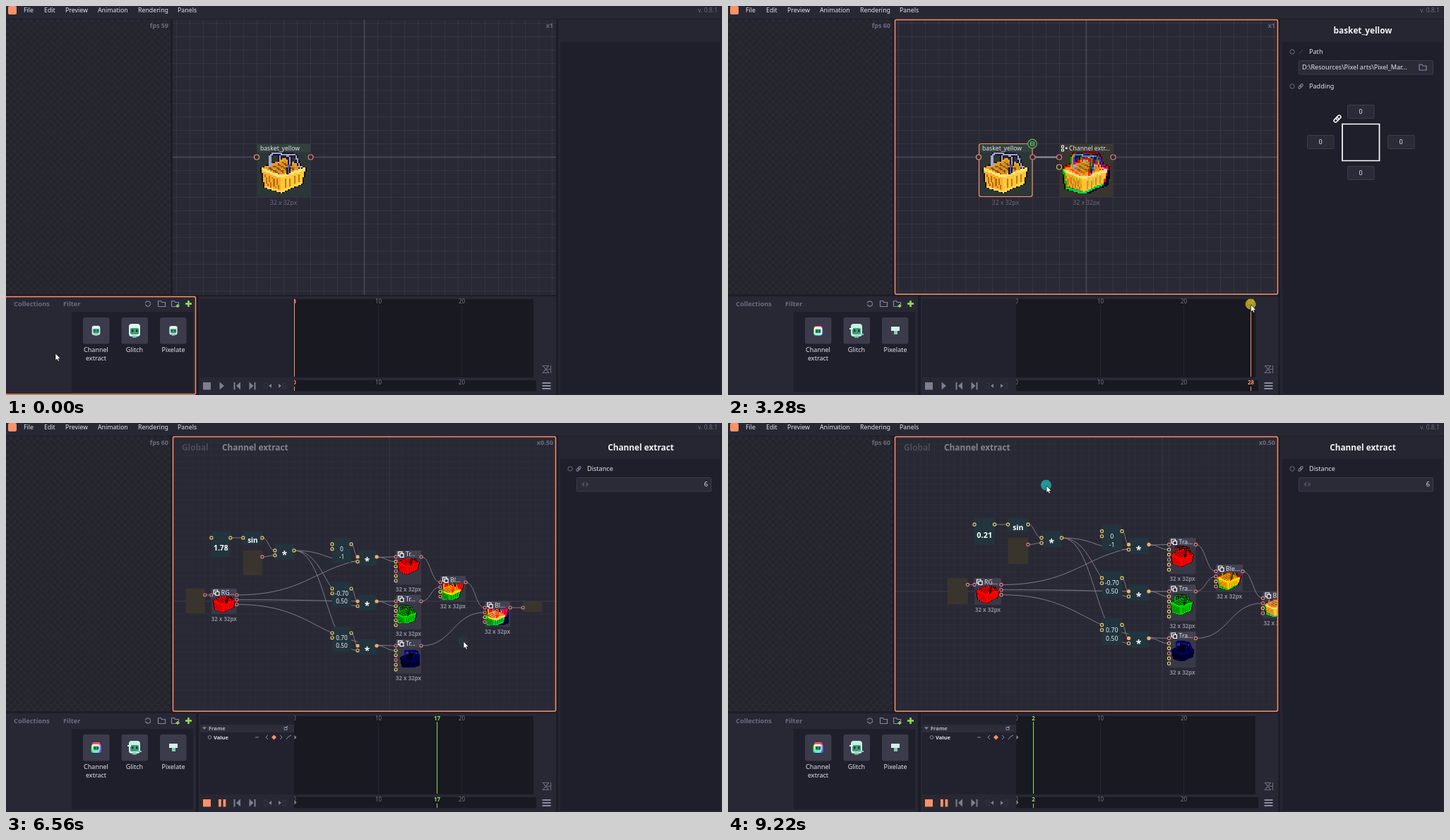
An HTML page with a canvas for the animation above (9290 ms loop, 1014 px wide and 552 px high).

```html
<!DOCTYPE html>
<html lang="en">
<head>
<meta charset="utf-8">
<title>Node editor</title>
<style>
html, body { margin: 0; width: 100%; height: 100%; overflow: hidden; background: #1e1e2a; }
canvas { display: block; }
</style>
</head>
<body>
<canvas id="stage" width="1014" height="552"></canvas>
<script>
const LOOP = 9290, UNIT = 19;
const c = document.getElementById('stage').getContext('2d');
const C = {
  panel: '#282834', dark: '#1f1f2b', deep: '#191921', edge: '#1d1d28', thumb: '#3b3b4c',
  grey: '#6d6b80', dim: '#4b4a5b', text: '#e4e4ec', accent: '#ff9166', lime: '#8fde5d',
  pink: '#e87f86', gold: '#f0cf70', math: '#22343e', image: '#383846', io: '#39352d'
};

// Moments of the session
const DROP = 900, FOCUS = 1040, PICK = 1230, LINK = 2170, ENTER = 4700, PLAY = 6155;

const pointer = [
  [0, 70, 493], [100, 70, 493], [420, 128, 460], [520, 128, 460], [880, 470, 196], [960, 470, 196],
  [1200, 395, 235], [1450, 395, 235], [1700, 431, 215], [1790, 431, 215], [2080, 469, 221],
  [2200, 469, 221], [2700, 411, 424], [2800, 411, 424], [3300, 742, 424], [3800, 480, 424],
  [3920, 480, 424], [4300, 520, 249], [4750, 520, 249], [5100, 516, 264], [5690, 516, 264],
  [5980, 306, 538], [6190, 306, 538], [6480, 648, 310], [8620, 648, 310], [8860, 374, 99],
  [8930, 374, 99], [9220, 451, 89], [LOOP, 451, 89]
];
// time, zoom, origin x, origin y
const camera = [
  [ENTER, 1, 507, 214.5], [5120, 1, 507, 214.5], [5320, .686, 510, 229], [5400, .65, 510.5, 231],
  [5450, .65, 510.5, 231], [5620, .4, 512, 245], [6380, .4, 512, 245], [6470, .4, 559.4, 262.7],
  [6500, .4, 559.4, 262.7], [6560, .474, 543, 253], [6680, .5, 537.3, 249.6], [8930, .5, 537.3, 249.6],
  [9220, .5, 615, 239], [LOOP, .5, 615, 239]
];
const presses = [
  [500, 900], [1220, 1290], [1740, 2170], [2770, 3850], [4560, 4610], [4670, 4720], [6110, 6180],
  [6380, 6470, 1], [8930, LOOP, 1]
];
const zoomLabels = [[5120, '1'], [5220, '0.80'], [5450, '0.65'], [5520, '0.50'], [6500, '0.40'], [LOOP, '0.50']];

function sample(keys, t) {
  let i = 0;
  while (i < keys.length - 2 && keys[i + 1][0] <= t) i++;
  const a = keys[i], b = keys[i + 1];
  let k = Math.min(1, Math.max(0, (t - a[0]) / (b[0] - a[0])));
  k = k * k * (3 - 2 * k);
  return a.slice(1).map((v, n) => v + (b[n + 1] - v) * k);
}

// Drawing helpers
function text(s, x, y, size = 9, color = C.text, align = 'left', weight = 500) {
  c.font = `${weight} ${size}px "Noto Sans", "Open Sans", sans-serif`;
  c.textAlign = align;
  c.fillStyle = color;
  c.fillText(s, x, y + size * .35);
}
function box(x, y, w, h, fill, stroke, r = 0, lw = 1) {
  c.beginPath();
  c.roundRect(x, y, w, h, r);
  if (fill) { c.fillStyle = fill; c.fill(); }
  if (stroke) { c.strokeStyle = stroke; c.lineWidth = lw; c.stroke(); }
}
function trace(pts) {
  c.beginPath();
  pts.forEach(p => c.lineTo(p[0], p[1]));
}
function line(pts, color, w = 1) {
  trace(pts);
  c.strokeStyle = color;
  c.lineWidth = w;
  c.stroke();
}
function poly(pts, fill) {
  trace(pts);
  c.fillStyle = fill;
  c.fill();
}
function ring(x, y, r, stroke, fill, w = 1.2) {
  c.beginPath();
  c.arc(x, y, r, 0, 7);
  if (fill) { c.fillStyle = fill; c.fill(); }
  c.strokeStyle = stroke;
  c.lineWidth = w;
  c.stroke();
}
function wire(x1, y1, x2, y2, color, w) {
  const m = (x1 + x2) / 2;
  c.beginPath();
  c.moveTo(x1, y1);
  c.bezierCurveTo(m, y1, m, y2, x2, y2);
  c.strokeStyle = color;
  c.lineWidth = w;
  c.stroke();
}
function clipTo(x, y, w, h, draw) {
  c.save();
  c.beginPath();
  c.rect(x, y, w, h);
  c.clip();
  draw();
  c.restore();
}

// Pixel sprites
function grid32() {
  const g = document.createElement('canvas').getContext('2d');
  g.canvas.width = g.canvas.height = 32;
  return g;
}
function makeBasket() {
  const g = grid32();
  const paint = (pts, color, width) => {
    const p = new Path2D();
    pts.forEach(q => p.lineTo(q[0], q[1]));
    if (!width) p.closePath();
    g.lineWidth = width || 1;
    g.fillStyle = color;
    for (let i = 0; i < 1024; i++) {
      const x = i % 32, y = i >> 5;
      if (width ? g.isPointInStroke(p, x + .5, y + .5) : g.isPointInPath(p, x + .5, y + .5)) g.fillRect(x, y, 1, 1);
    }
  };
  const L = [1, 15], F = [14, 20.5], R = [31, 15], B = [17, 8.5], FB = [14.5, 31], LB = [3, 27], RB = [28.5, 24.5];
  paint([L, B, R, RB, FB, LB, L, F], '#1a0c08', 2);
  paint([L, B, R, F], '#de9420');
  for (let i = 0; i < 4; i++) paint([[5 + i * 3.4, 13.5 - i], [13 + i * 3.4, 18.5 - i]], '#8d520c', 1);
  paint([L, F, FB, LB], '#f8b028');
  paint([F, R, RB, FB], '#ffc93a');
  for (let i = 1; i < 5; i++) {
    paint([[1 + i * 2.6, 18 + i], [3 + i * 2.4, 26 + i * .8]], '#b96c10', 1);
    paint([[14 + i * 3.2, 23.5 - i], [14.5 + i * 2.9, 29 - i * 1.2]], '#c27a10', 1);
  }
  paint([LB, FB, RB], '#ffd95c', 1.2);
  paint([L, B, R], '#e7a326', 1.2);
  paint([L, F, R], '#ffe173', 2);
  const arcs = [
    [[7, 14], [7, 6], [9, 4.5], [17, 4.5], [21, 8], [19, 19]],
    [[13, 9], [14, 6], [19, 5], [24, 6], [27.5, 15]]
  ];
  for (const a of arcs) {
    paint(a, '#15142a', 2.6);
    paint(a, '#a5a6c6', 1.1);
  }
  paint([[20, 12], [19.5, 19]], '#4a55a8', 1.3);
  return g.canvas;
}
function tint(src, color) {
  const g = grid32();
  g.drawImage(src, 0, 0);
  g.globalCompositeOperation = 'multiply';
  g.fillStyle = color;
  g.fillRect(0, 0, 32, 32);
  g.globalCompositeOperation = 'destination-in';
  g.drawImage(src, 0, 0);
  return g.canvas;
}
const basket = makeBasket();
const channels = ['#f00', '#0f0', '#00f'].map(k => tint(basket, k));
const shifts = [[0, -1], [-.7, .5], [.7, .5]];
const mixer = grid32();

function mix(ids, amount) {
  mixer.globalCompositeOperation = 'lighter';
  mixer.clearRect(0, 0, 32, 32);
  for (const i of ids) mixer.drawImage(channels[i], Math.round(shifts[i][0] * amount), Math.round(shifts[i][1] * amount));
  return mixer.canvas;
}

// Contents of the group: kind, title, x, y, w, h, inputs, outputs, extra
const nodes = [
  ['num', '', -28, -11, 3, 4, 1, 1],
  ['sin', '', -23, -11, 3, 2.1, 1, 1],
  ['io', '', -23, -8, 3, 3.9, 0, 1],
  ['mul', 'Math', -18, -9, 3, 2.4, 2, 1],
  ['io', '', -32, -2, 3, 3.9, 0, 1],
  ['img', 'RGB Extract', -28, -2, 4, 4, 1, 3, 'r'],
  ...[0, 1, 2].flatMap(i => [
    ['vec', 'Vector2', -9, -10 + 7 * i, 3, 3.9, 2, 1, i],
    ['mul', 'Math', -5, -8 + 7 * i, 3, 2.4, 2, 1, 'array'],
    ['img', 'Transform', 1, -8 + 7 * i, 4, 5.4, 6, 1, [i]]
  ]),
  ['img', 'Blend', 8, -4, 4, 4, 4, 1, [0, 1]],
  ['img', 'Blend', 15, 0, 4, 4, 4, 1, [0, 1, 2]],
  ['io', '', 21, 0, 3, 1.7, 1, 0]
];
// from node, output, to node, input
const links = [
  [0, 0, 1, 0], [1, 0, 3, 0], [2, 0, 3, 1], [4, 0, 5, 0],
  ...[0, 1, 2].flatMap(i => [[3, 0, 7 + 3 * i, 1], [6 + 3 * i, 0, 7 + 3 * i, 0], [7 + 3 * i, 0, 8 + 3 * i, 1], [5, i, 8 + 3 * i, 0]]),
  [8, 0, 15, 0], [11, 0, 15, 1], [15, 0, 16, 0], [14, 0, 16, 1], [16, 0, 17, 0]
];
const vectors = [['0', '-1'], ['-0.70', '0.50'], ['0.70', '0.50']];

function fit(s, w, size) {
  c.font = `500 ${size}px "Noto Sans", "Open Sans", sans-serif`;
  if (c.measureText(s).width <= w) return s;
  while (s.length > 1 && c.measureText(s + '...').width > w) s = s.slice(0, -1);
  return s + '...';
}
function preview(img, x, y, w, h) {
  const k = w * .875;
  c.imageSmoothingEnabled = false;
  c.drawImage(img, x + (w - k) / 2, y + (h - k) / 2, k, k);
}
function backdrop(s, ox, oy) {
  box(236, 19, 543, 391, '#292935');
  const u = UNIT * s;
  const shade = `rgba(150,150,180,${.02 + .08 * s * s})`;
  for (let x = ox - Math.ceil((ox - 236) / u) * u; x < 779; x += u) line([[x, 19], [x, 410]], shade);
  for (let y = oy - Math.ceil((oy - 19) / u) * u; y < 410; y += u) line([[236, y], [779, y]], shade);
  const axis = `rgba(140,140,165,${.03 + .2 * s * s})`;
  line([[ox, 19], [ox, 410]], axis, 1.8);
  line([[236, oy], [779, oy]], axis, 1.8);
}
function drawGroup(t, frame) {
  const [s, ox, oy] = sample(camera, t), u = UNIT * s, r = .9 + 2.4 * s;
  const angle = frame * Math.PI / 30, amount = Math.sin(angle) * 6;
  backdrop(s, ox, oy);
  const port = (n, i, out) => [ox + (n[2] + (out ? n[4] : 0)) * u, oy + (n[3] + 1 + .75 * i) * u];
  for (const [a, o, b, i] of links) wire(...port(nodes[a], o, 1), ...port(nodes[b], i), '#85838f', .9);
  for (const n of nodes) {
    const [kind, title, nx, ny, nw, nh, ins, outs, extra] = n;
    const x = ox + nx * u, y = oy + ny * u, w = nw * u, h = nh * u, m = x + w / 2;
    const img = kind === 'img';
    box(x, y, w, h, img ? C.image : kind === 'io' ? C.io : C.math, null, 2);
    if (img) {
      preview(extra === 'r' ? channels[0] : mix(extra, amount), x, y, w, h);
      box(x, y, w, 11, '#414152', null, 2);
      text('32 x 32px', m, y + h + 7, 7.9, '#8b8998', 'center', 600);
      box(x + 3.5, y + 2, 5.5, 5.5, null, '#fff', 0, 1.2);
      box(x + 6, y + 4.5, 5, 5, C.image, '#fff', 0, 1.2);
    }
    if (title && w > 33) text(fit(title, w - (img ? 16.7 : 9), 8.7), x + (img ? 14 : 5), y + 5.5, 8.7);
    if (kind === 'num') text(angle.toFixed(2), m, y + 2.6 * u, 1.15 * u, '#fff', 'center', 700);
    if (kind === 'sin') text('sin', m, y + 1.45 * u, 1.1 * u, '#fff', 'center', 700);
    if (kind === 'mul') text('*', m, y + 1.75 * u, 1.5 * u, '#fff', 'center', 700);
    if (kind === 'vec') vectors[extra].forEach((v, i) => text(v, m, y + (1.75 + 1.28 * i) * u, .92 * u, '#f0f0f4', 'center'));
    const warm = img || kind === 'io';
    for (let i = 0; i < ins; i++) {
      const full = extra === 'array' && !i;
      ring(...port(n, i), r, full ? '#f5ad68' : warm && (i === 0 || i === 3 || nh === 4 && i < 2) ? C.pink : C.gold, full ? '#f5ad68' : '#2b2b33', 1.1);
    }
    for (let i = 0; i < outs; i++) {
      const full = extra === 'array';
      ring(...port(n, i, 1), r, full ? '#f5ad68' : warm ? C.pink : C.gold, full ? '#f5ad68' : '#2b2b33', 1.1);
    }
  }
  text('Global', 249, 35, 11.8, '#4c4b59', 'left', 600);
  text('Channel extract', 306, 35, 11.8, '#86858f', 'left', 600);
  text('x' + zoomLabels.find(z => t < z[0])[1], 775, 28, 9, C.grey, 'right', 600);
}
function drawRoot(t, frame, mx, my) {
  backdrop(1, 507.5, 214.5);
  const linked = t >= LINK, made = t >= DROP, picked = t >= PICK, linking = t > 1740 && !linked;
  if (linked) wire(431, 214.5, 469, 214.5, '#94929d', 1.8);
  box(355, 195.5, 76.5, 75.5, '#2d3636', null, 3);
  preview(basket, 355, 195, 76, 76);
  box(355, 195.5, 76.5, 12, '#33413e', null, 3);
  if (picked) box(355.5, 195.5, 75.5, 75, null, C.accent, 3, 1.2);
  text('basket_yellow', 360, 201.5, 8.6);
  text('32 x 32px', 393, 279.5, 8.5, C.grey, 'center');
  ring(355, 214.5, 3.5, '#f59b6f', '#2b2b33');
  ring(431.5, 214.5, 3.5, C.pink, '#2b2b33');
  if (picked) {
    ring(431, 195.5, 6.3, '#62b35a', '#294034');
    box(428.5, 193, 5, 5, null, '#76c46a');
    line([[428.5, 195.5], [433.5, 195.5]], '#76c46a', .8);
  }
  if (made) {
    box(469.5, 195.5, 76.5, 75.5, '#38352f', null, 3);
    if (linked) preview(mix([0, 1, 2], Math.sin(frame * Math.PI / 30) * 6), 469.5, 195, 76, 76);
    box(469.5, 195.5, 76.5, 12, '#3b3831', null, 3);
    if (!picked) box(469.5, 195.5, 76, 75, null, C.accent, 3, 1.2);
    box(472.5, 198, 3, 3, null, '#fff');
    box(472.5, 203, 3, 3, null, '#fff');
    box(478, 200.5, 2.5, 2.5, '#fff');
    text('Channel extr...', 483, 201.5, 8.7);
    text(linked ? '32 x 32px' : '1 x 1px', 507.5, 279.5, 8.5, C.grey, 'center');
    ring(469, 214.5, 3.5, linked ? C.pink : '#f5a06a', '#2b2b33');
    ring(469, 228.5, 3.5, '#e9b06a', '#2b2b33');
    ring(545.5, 214.5, 3.5, C.pink, '#2b2b33');
  }
  if (linking) {
    wire(431.5, 214.5, mx, my, '#d8d2b0', 1.4);
    if (mx > 450) {
      text('Input', 463, 214.5, 8.7, '#fff', 'right', 700);
      text('Distance', 463, 228.5, 8.9, C.grey, 'right');
    }
  }
  text('x1', 775, 28, 9, C.grey, 'right', 600);
}

function folder(x, y) {
  line([[x - 5, y + 4], [x - 5, y - 4], [x - 1, y - 4], [x, y - 2], [x + 5, y - 2], [x + 5, y + 4], [x - 5, y + 4]], '#8886a0', 1.2);
}
function chain(x, y, k, color) {
  c.save();
  c.translate(x, y);
  c.rotate(-.8);
  box(-4 * k, -1.5 * k, 5 * k, 3 * k, null, color, 1.5 * k, k);
  box(-k, -1.5 * k, 5 * k, 3 * k, null, color, 1.5 * k, k);
  c.restore();
}
function drawInspector(t) {
  box(782, 19, 232, 533, '#262632');
  box(785, 51, 227, 499, C.dark);
  if (t < DROP) return;
  const image = t >= PICK && t < ENTER;
  text(image ? 'basket_yellow' : 'Channel extract', 899, 35, 11.8, '#f2f2f6', 'center', 600);
  ring(799, 65, 3.2, C.grey, null, 1);
  box(808.5, 77.5, 190, 19.5, '#2b2b38', '#3b3b4c', 1);
  if (!image) {
    chain(811, 65, 1, '#8886a0');
    text('Distance', 823, 65, 9.1);
    poly([[819, 83], [819, 91], [815, 87]], C.dim);
    poly([[821.5, 83], [821.5, 91], [825.5, 87]], C.dim);
    text('6', 994, 87, 9.1, C.text, 'right');
    return;
  }
  line([[808, 68], [814, 62]], C.dim);
  text('Path', 823, 65, 9.1);
  text('D:\\Resources\\Pixel arts\\Pixel_Mar...', 813, 87, 9.1);
  folder(984, 87);
  ring(799, 114, 3.2, C.grey, null, 1);
  chain(811, 114, 1, '#8886a0');
  text('Padding', 823, 114, 9.1);
  for (const [x, y] of [[877, 140], [820, 183], [934, 183], [877, 227]]) {
    box(x + .5, y + .5, 37.5, 19, '#2b2b38', '#3b3b4c', 1);
    text('0', x + 19, y + 10, 9.1, C.text, 'center');
  }
  box(870, 167.5, 52.5, 52, null, '#fff', 0, 1.7);
  chain(863, 160, 1.5, '#fff');
}

function face(x, y, k, hue) {
  box(x - 4 * k, y - 5 * k, 8 * k, 9 * k, hue || '#e2f4ef', null, 2 * k);
  box(x - 3 * k, y - 2 * k, 6 * k, 4.5 * k, '#3f9f7c', null, k);
  box(x - 2 * k, y - k, 1.2 * k, 1.8 * k, '#123a35');
  box(x + k, y - k, 1.2 * k, 1.8 * k, '#123a35');
  box(x - 1.5 * k, y + 3.2 * k, 3 * k, 1.6 * k, '#78d3ac');
}
function drawCollections(t) {
  box(0, 412, 269, 140, C.panel);
  box(93, 434, 172, 114, C.dark);
  text('Collections', 11, 422.5, 9.3, C.grey, 'left', 600);
  text('Filter', 81, 422.5, 9.3, C.grey, 'left', 600);
  c.beginPath();
  c.arc(201, 422.5, 3.6, 3.4, 6);
  c.moveTo(204.5, 424);
  c.arc(201, 422.5, 3.6, .3, 2.9);
  c.strokeStyle = '#8886a0';
  c.lineWidth = 1.2;
  c.stroke();
  folder(220.5, 422.5);
  folder(239.5, 422.5);
  line([[243, 423], [243, 428]], C.lime, 1.5);
  line([[240.5, 425.5], [245.5, 425.5]], C.lime, 1.5);
  line([[258.5, 418], [258.5, 427]], C.lime, 2.6);
  line([[254, 422.5], [263, 422.5]], C.lime, 2.6);
  for (const x of [109, 163.5, 218]) box(x, 442, 37.5, 37.5, C.thumb, null, 3);
  text('Channel', 127.5, 488, 9, C.text, 'center');
  text('extract', 127.5, 500, 9, C.text, 'center');
  text('Glitch', 182, 488, 9, C.text, 'center');
  text('Pixelate', 237, 488, 9, C.text, 'center');

  const phase = t % 666, d = Math.round(4.5 * Math.sin(phase / 666 * Math.PI));
  if (d) {
    c.globalCompositeOperation = 'lighter';
    [['#e01818', 0, -d], ['#00b830', -d * .7, d * .5], ['#1030e0', d * .7, d * .5]].forEach(([k, x, y]) => box(122 + x, 455 + y, 11.5, 12, k, null, 3));
    c.globalCompositeOperation = 'source-over';
    box(123.5, 458.5, 8, 6, '#22a052', null, 1);
    box(125, 460, 1.7, 2.6, '#123a35');
    box(129, 460, 1.7, 2.6, '#123a35');
  } else face(127.5, 461, 1.45);

  const jag = phase > 300 && phase < 620;
  face(182, 461, 2, phase > 100 && phase < 640 ? '#c9efe4' : '');
  if (jag) {
    box(172, 457, 5, 2, '#e2f4ef');
    box(185, 465, 7, 2, '#78d3ac');
  }
  if (phase < 250) face(237, 461, 1.4);
  else if (phase < 480) {
    box(231, 455, 12, 11, '#d9f0ee');
    box(235, 459, 5, 4, '#55b394');
  } else if (phase < 640) {
    box(231, 455, 12, 6, '#d9f0ee');
    box(235, 461, 5, 5, '#7cd0b2');
  } else {
    box(232, 456, 5, 5, '#b9d8d4');
    box(237, 461, 5, 5, '#86b5aa');
    box(237, 456, 5, 5, '#56706f');
  }
}

function drawTimeline(t, frame) {
  const playing = t >= PLAY, mark = playing ? C.lime : C.accent;
  const at = f => Math.floor(408.5 + f * 11.86) + .5;
  box(273, 412, 506, 140, C.panel);
  box(275, 416, 133, 111, '#22222e');
  box(408, 416, 339, 111, C.deep);
  box(408, 531, 343, 15.5, C.deep);
  clipTo(408, 412, 343, 136, () => {
    for (const f of [0, 10, 20]) {
      if (f) line([[at(f), 424], [at(f), 526]], '#24242f');
      if (f === frame) continue;
      text(f, at(f), 419.5, 8, '#77758a', 'center');
      text(f, at(f), 534.5, 8, '#77758a', 'center');
    }
    const x = at(frame);
    line([[x, frame ? 424 : 416], [x, 526]], mark);
    line([[x, 540], [x, 546]], mark);
    text(frame, x, 419.5, 8, mark, 'center', 700);
    text(frame, x, 534.5, 8, mark, 'center', 700);
  });
  if (t >= ENTER) {
    box(275, 428, 133, 11, '#2d2d3a');
    poly([[278, 431.5], [284, 431.5], [281, 435]], '#8886a0');
    text('Frame', 287, 433, 7.5, '#b5b4c2', 'left', 600);
    box(394, 431.5, 4, 4, null, '#8886a0');
    line([[396, 433], [399, 430]], '#b5b4c2');
    ring(288.5, 446, 2.3, '#8886a0', null, 1);
    text('Value', 294, 446, 7.5, '#e0dfe8', 'left', 600);
    line([[353, 446], [358, 446]], '#8886a0');
    line([[371, 443], [368, 446], [371, 449]], '#8886a0');
    poly([[379.5, 442.5], [383, 446], [379.5, 449.5], [376, 446]], C.accent);
    line([[388, 443], [391, 446], [388, 449]], '#8886a0');
    line([[397, 449], [400, 445], [404, 443]], '#8886a0');
    for (const y of [446, 538.5]) poly([[408.5, y - 3], [411.5, y], [408.5, y + 3]], '#8886a0');
  }
  const btn = playing ? C.accent : '#7f7d92';
  box(279, 534, 11, 10.5, btn);
  if (playing) {
    box(301, 534, 3.8, 10.5, btn);
    box(307.5, 534, 3.8, 10.5, btn);
  } else poly([[302.5, 533.5], [309, 539], [302.5, 544.5]], btn);
  const g = '#7f7d92';
  box(322.5, 534, 2, 10.5, g);
  poly([[332, 533.5], [326, 539], [332, 544.5]], g);
  poly([[344.5, 533.5], [350.5, 539], [344.5, 544.5]], g);
  box(351.5, 534, 2, 10.5, g);
  box(366, 535, 4, 8, null, '#363645');
  poly([[376, 536], [372, 539], [376, 542]], g);
  poly([[386, 536], [390, 539], [386, 542]], g);
  box(392, 535, 4, 8, null, '#363645');
  line([[759.5, 510.5], [768.5, 510.5], [760.5, 520.5], [768.5, 520.5]], C.grey, 1.2);
  line([[759.5, 520.5], [768.5, 520.5], [760.5, 510.5]], C.grey, 1.2);
  line([[771.5, 510], [771.5, 521]], C.grey);
  line([[766, 515.5], [771, 515.5]], C.grey);
  for (const y of [534, 538, 542]) box(759.5, y, 12, 2, '#8c8aa0');
}

function drawShell(t) {
  box(0, 0, 1014, 552, C.edge);
  box(0, 0, 1014, 18, C.panel);
  box(3, 0, 12, 12, C.accent, null, 2);
  [['File', 25], ['Edit', 54], ['Preview', 84], ['Animation', 130], ['Rendering', 187], ['Panels', 243]].forEach(([s, x]) => text(s, x, 6, 8.8));
  text('v. 0.8.1', 1008, 6, 8.6, C.grey, 'right');
  box(0, 19, 233, 390, '#292932');
  clipTo(0, 19, 233, 390, () => {
    const k = 4.75;
    c.fillStyle = '#24242d';
    for (let j = 0; j < 83; j++) for (let i = j % 2; i < 50; i += 2) c.fillRect(i * k, 19 + j * k, k, k);
  });
  text('fps ' + (t < 500 ? 59 : 60), 230, 28, 9, C.grey, 'right', 600);
}
function drawPointer(t, x, y) {
  if (t > 520 && t < DROP) {
    c.globalAlpha = .5;
    face(x + 12, y + 14, 1.45);
    c.globalAlpha = 1;
  }
  for (const [a, b, middle] of presses) {
    if (t < a || t > b + 100) continue;
    c.globalAlpha = t > b ? .85 * (1 - (t - b) / 100) : .85;
    c.beginPath();
    c.arc(x - .5, y - 1, 7.5, 0, 7);
    c.fillStyle = middle ? '#20a8a8' : '#c0ae1c';
    c.fill();
    c.globalAlpha = 1;
  }
  const shape = [[0, 0], [0, 10], [2.2, 8], [3.8, 11.3], [5.4, 10.5], [4, 7.4], [7, 7.2], [0, 0]].map(p => [x + p[0], y + p[1]]);
  poly(shape, '#fff');
  line(shape, '#111', .7);
}

function draw(t) {
  const [mx, my] = sample(pointer, t);
  let frame = t < 2780 ? 0 : 6;
  if (t >= 2780 && t < 3850) frame = Math.max(0, Math.round((mx - 408.5) / 11.86));
  if (t >= PLAY) frame = (6 + Math.floor((t - PLAY) * .0282)) % 30;
  drawShell(t);
  clipTo(236, 19, 543, 391, () => t < ENTER ? drawRoot(t, frame, mx, my) : drawGroup(t, frame));
  drawInspector(t);
  drawCollections(t);
  drawTimeline(t, frame);
  if (t < FOCUS) box(-1, 412.5, 269.5, 138.5, null, C.accent, 2, 1.5);
  else box(236.5, 19.5, 542, 389.5, null, C.accent, 2, 1.5);
  drawPointer(t, mx, my);
}

const start = performance.now();
function tick() {
  draw((performance.now() - start) % LOOP);
  requestAnimationFrame(tick);
}
tick();
</script>
</body>
</html>
```
